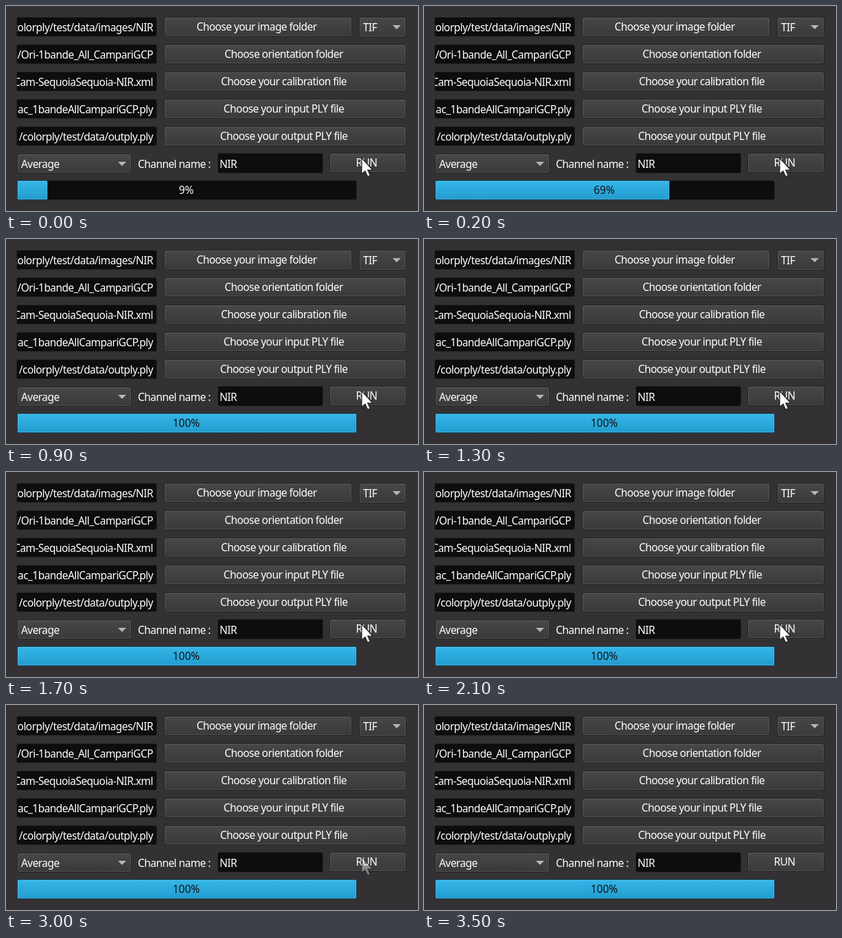
An HTML page for the animation above (3700 ms loop, 600x300 px).

```html
<!DOCTYPE html>
<html lang="en">
<head>
<meta charset="utf-8">
<title>Point cloud colouring dialog</title>
<style>
html, body { margin: 0; width: 100%; height: 100%; overflow: hidden; background: #333133; }
#stage {
  position: relative; width: 600px; height: 300px; overflow: hidden;
  font: 15.5px "Noto Sans", "Open Sans", sans-serif; letter-spacing: -.56px; color: #fff;
}
#stage > * { position: absolute; box-sizing: border-box; }
.box {
  display: flex; align-items: center; justify-content: center;
  white-space: pre; overflow: hidden; border-radius: 3px;
}
.button, .combo {
  background: linear-gradient(#484648, #3b393b); border: 1px solid #242224;
  box-shadow: inset 0 0 0 1px #ffffff1c;
}
.button { padding: 0 4px 1px 0; }
.field { background: #0d0c0e; border: 1px solid #262426; padding-top: 1px; }
.path { justify-content: flex-end; padding-right: 5px; }
.left, .combo { justify-content: flex-start; padding-left: 5px; }
.left { padding-left: 2px; }
.combo::after {
  content: ""; position: absolute; right: 7px; top: 11px;
  border: 6px solid transparent; border-top-color: #b8b6b8; border-bottom: 0;
}
#fill {
  left: 16px; top: 255px; height: 29px; border-radius: 2px;
  background: linear-gradient(#35b6e8, #239ccf); border: 1px solid #12465c;
  box-shadow: inset 0 0 0 1px #ffffff24;
}
#percent { left: 16px; top: 255px; width: 495px; height: 29px; padding: 0 2px 1px 0; letter-spacing: 0; }
#cursor { left: 515px; top: 220px; }
</style>
</head>
<body>
<div id="stage"></div>
<script>
const stage = document.getElementById("stage");

function box(kind, x, y, w, h, text = "") {
  const el = document.createElement("div");
  el.className = "box " + kind;
  el.textContent = text;
  el.style.cssText = `left:${x}px;top:${y}px;width:${w}px;height:${h}px`;
  stage.append(el);
}

const rows = [
  ["/colorply/test/data/images/NIR", "Choose your image folder"],
  ["/Ori-1bande_All_CampariGCP", "Choose orientation folder"],
  ["Cam-SequoiaSequoia-NIR.xml", "Choose your calibration file"],
  ["ac_1bandeAllCampariGCP.ply", "Choose your input PLY file"],
  ["/colorply/test/data/outply.ply", "Choose your output PLY file"]
];
rows.forEach(([path, label], i) => {
  const y = 16 + 40 * i;
  box("field path", 15, y, 205, 29, path);
  box("button", 230, y, i ? 353 : 274, 29, label);
});
box("combo", 514, 16, 69, 30, "TIF");
box("combo", 16, 216, 167, 29, "Average");
box("left", 190, 216, 115, 29, "Channel name :");
box("field left", 308, 215, 154, 30, "NIR");
box("button", 471, 215, 112, 29, "RUN");
box("field", 16, 255, 495, 29);

stage.insertAdjacentHTML("beforeend", `
  <div id="fill"></div>
  <div id="percent" class="box"></div>
  <svg id="cursor" width="24" height="34">
    <path d="M3 2.5V26L8 21.4 11.6 29.6 15.4 28 11.8 20H19Z" fill="#fff" stroke="#222" stroke-width="1.2"/>
  </svg>`);
const [fill, percent, cursor] = ["fill", "percent", "cursor"].map(id => document.getElementById(id));

function draw(now) {
  const step = Math.floor(now % 3700 / 100);
  const done = Math.min(100, 9 + 30 * step);
  fill.style.width = 495 * done / 100 + "px";
  percent.textContent = done + "%";
  percent.style.color = done > 50 ? "#111" : "#fff";
  // The pointer fades out in five steps from 2.8 s.
  cursor.style.opacity = Math.max(0, Math.min(1, (32 - step) / 5));
}

const start = performance.now();
function tick() {
  draw(performance.now() - start);
  requestAnimationFrame(tick);
}
tick();
</script>
</body>
</html>
```
